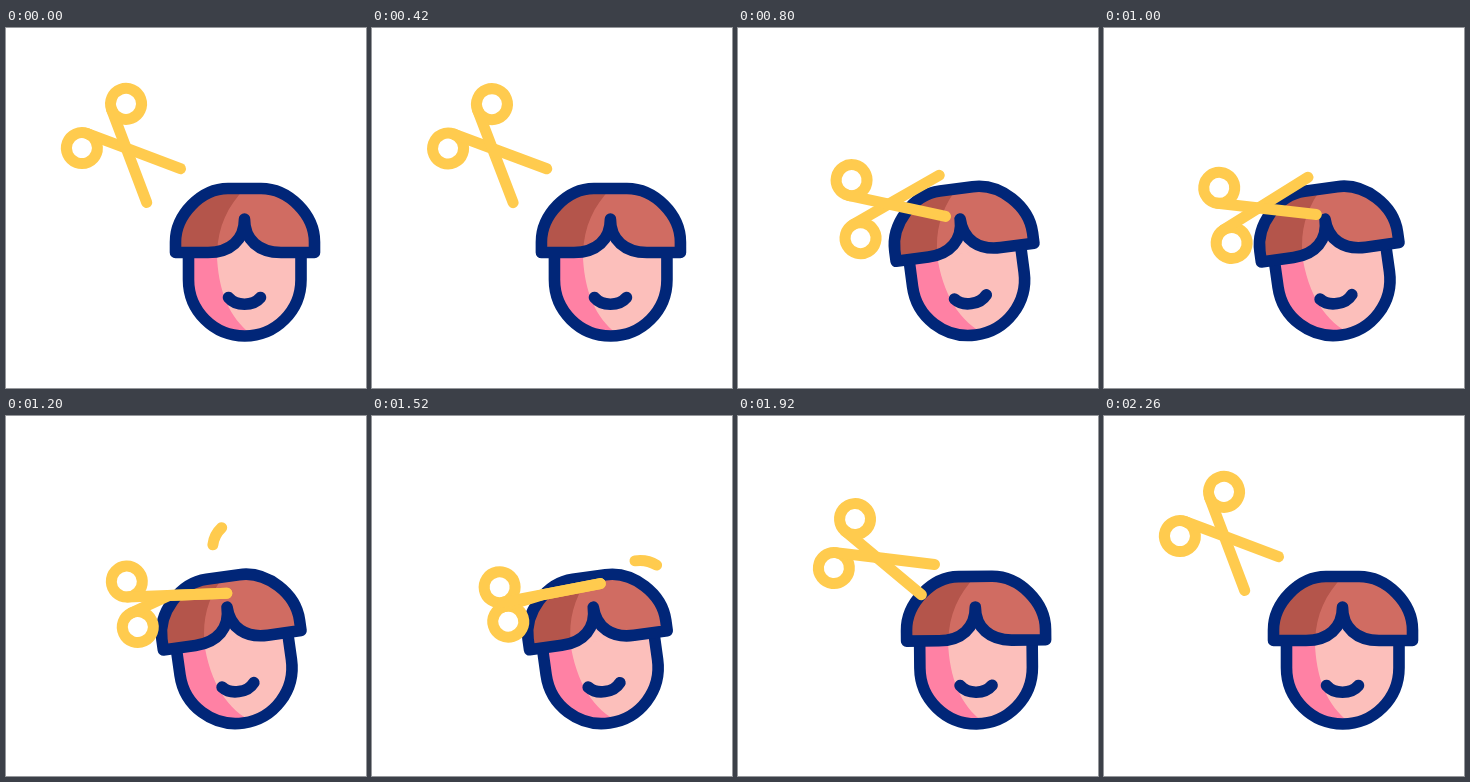
Recreate the animation shown at these times as an HTML page. Size 360 by 360 pixels, loop 2.4 s.

```html
<!DOCTYPE html>
<html lang="en">
<head>
<meta charset="utf-8">
<title>Haircut</title>
<style>
html, body { margin: 0; width: 100%; height: 100%; overflow: hidden; background: #fff; }
svg { display: block; width: 100vw; height: 100vh; }
.line { fill: none; stroke: #012678; stroke-width: 11.6; stroke-linecap: round; stroke-linejoin: round; }
.gold { fill: none; stroke: #ffcb4e; stroke-width: 11; stroke-linecap: round; stroke-linejoin: round; }
</style>
</head>
<body>
<svg viewBox="0 0 360 360">
  <defs>
    <path id="face" d="M182.5 225V251.75a56.25 56.25 0 0 0 112.5 0V225"/>
    <path id="hair" d="M169.5 224.5V214C169.5 187 195 160.5 222 160.5H255C283 160.5 308.5 187 308.5 214V224.5H275C253 224.5 238.5 212 238.5 191C238.5 212 224 224.5 202 224.5Z"/>
    <clipPath id="inFace"><use href="#face"/></clipPath>
    <clipPath id="inHair"><use href="#hair"/></clipPath>
  </defs>
  <g id="head">
    <path fill="#fcbfbb" d="M182.5 252V222L238.5 190L295 222V252Z"/>
    <use href="#face" fill="#fcbfbb"/>
    <path clip-path="url(#inFace)" fill="#ff81a4" d="M175 210H211C209 256 221 288 245 306V320H175Z"/>
    <use href="#face" class="line"/>
    <use href="#hair" fill="#d06c62"/>
    <path clip-path="url(#inHair)" fill="#b4554b" d="M160 150H250C224 172 211 196 211 230H160Z"/>
    <use href="#hair" class="line"/>
    <path class="line" d="M222.5 269.5C230 278.5 247 278.5 254.5 269.5"/>
  </g>
  <path id="lock" class="gold"/>
  <g id="scissors" class="gold">
    <g id="handleB"><circle cx="-41.5" cy="15.5" r="15.5"/><path d="M-41.5 0H0"/></g>
    <path id="bladeB" d="M0 0H58"/>
    <g><circle cx="-41.5" cy="-15.5" r="15.5"/><path d="M-41.5 0H58"/></g>
  </g>
</svg>
<script>
const LOOP = 2400;
const el = id => document.getElementById(id);
const clamp = v => Math.min(1, Math.max(0, v));
const ease = (t, from, to) => (1 - Math.cos(Math.PI * clamp((t - from) / (to - from)))) / 2;
const mix = (a, b, k) => a.map((v, i) => v + (b[i] - v) * k);
const turn = (id, ...a) => el(id).setAttribute('transform', `rotate(${a.join(' ')})`);

// Scissors poses: pivot x, pivot y, angle, gap between the handles
const rest = [120.2, 120.2, 69.3, 48.6];
const open = [153, 180, 8.3, 41.6];
const shut = [171.7, 179, -11.5, 6];

function drawScissors(t, approach) {
  const cut = mix(mix(rest, open, approach), shut, ease(t, 880, 1500));
  const [x, y, angle, gap] = mix(cut, rest, ease(t, 1480, 2230));
  el('scissors').setAttribute('transform', `translate(${x} ${y}) rotate(${angle})`);
  turn('handleB', -gap);
  turn('bladeB', -gap * ease(gap, 23, 31)); // blades meet before the handles do
}

// The cut lock swings clockwise in an arc over the head
function drawLock(t) {
  const size = ease(t, 1000, 1260) * (1 - ease(t, 1530, 1650));
  const lock = el('lock');
  lock.style.display = size > 0.01 ? '' : 'none';
  lock.style.strokeWidth = 11 * clamp(size * 1.6);
  const w = 11 * size, sag = 2 * size;
  lock.setAttribute('d', `M${-w} ${sag}Q0 ${-sag} ${w} ${sag}`);
  const swing = 74 * (t - 1200) / 320;
  lock.setAttribute('transform', `rotate(${swing} 225 175) translate(209.5 119.5) rotate(-63)`);
}

function draw(t) {
  const approach = ease(t, 400, 880);
  turn('head', -8 * (approach - ease(t, 1480, 2010)), 231, 316);
  drawScissors(t, approach);
  drawLock(t);
}

const start = performance.now();
function tick() {
  draw((performance.now() - start) % LOOP);
  requestAnimationFrame(tick);
}
tick();
</script>
</body>
</html>
```
